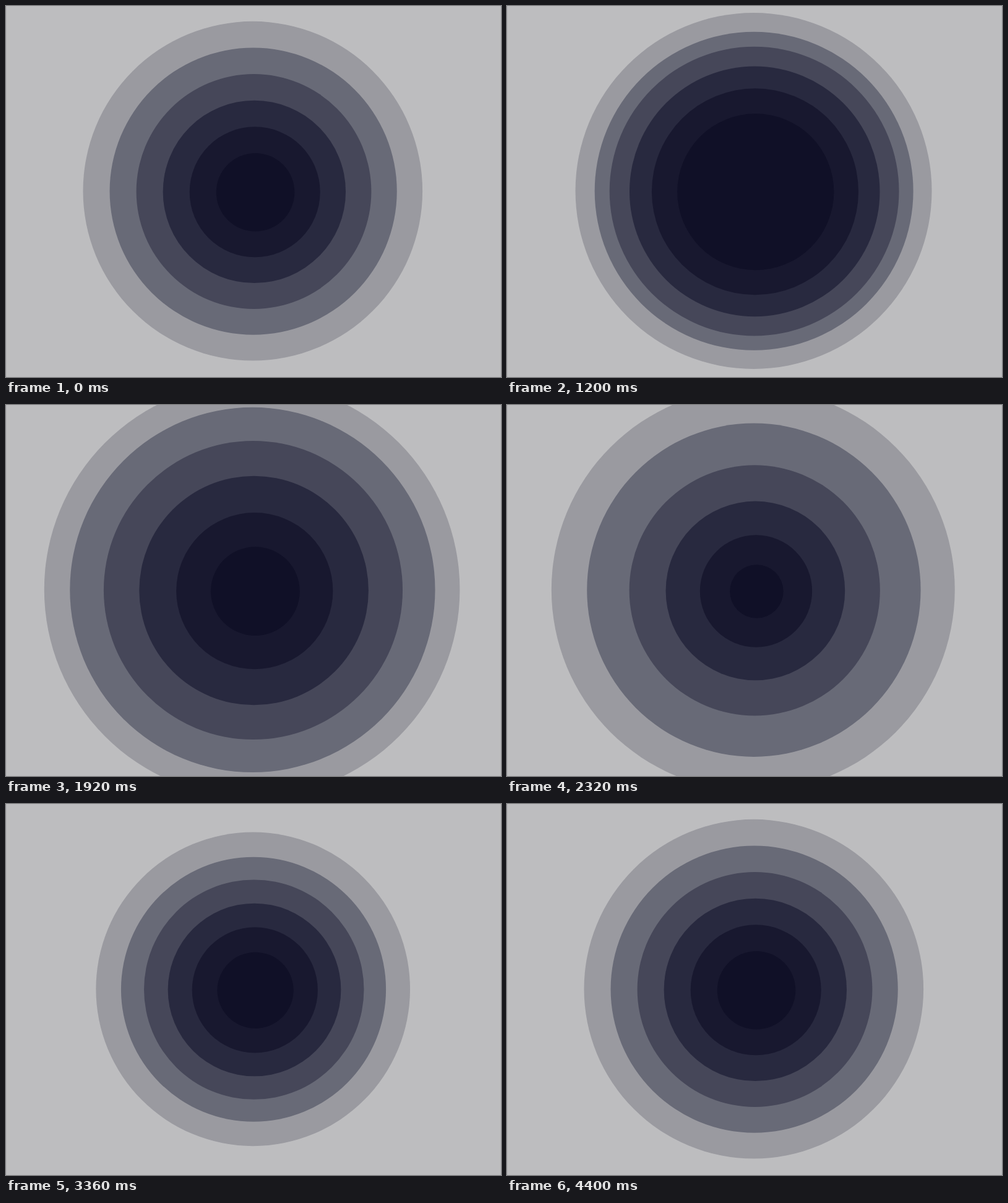
These frames come from a looping animation (800x600 px, 4840 ms). An HTML page:

```html
<!DOCTYPE html>
<html lang="en">
<head>
<meta charset="utf-8">
<title>Pulsing rings</title>
<style>
  html, body { margin: 0; width: 100%; height: 100%; overflow: hidden; background: #bdbdbf; }
  svg { display: block; width: 800px; height: 600px; }
</style>
</head>
<body>
<svg id="stage" viewBox="0 0 800 600">
  <path d="M.5 0V600M799.5 0V600" stroke="#b5b5b8"/>
</svg>
<script>
  const LOOP = 4840, STEP = 40, HOLD = 240;
  const UNIT = 21.1; // all radii and swings are multiples of this

  // Outermost first; size in units, start in ms.
  const rings = [
    { size: 13, start: 840, fill: '#9a9aa0' },
    { size: 11, start: 680, fill: '#686a77' },
    { size: 9, start: 440, fill: '#464759' },
    { size: 7, start: 280, fill: '#28293f' },
    { size: 5, start: 120, fill: '#18182f' },
    { size: 3, start: 0, fill: '#101027' }
  ];

  // Swell, shrink past rest, settle.
  const swing = [
    { from: 0, to: 3, time: 1200 },
    { from: 3, to: -1, time: 1200 },
    { from: -1, to: 0, time: 1160 }
  ];

  const stage = document.getElementById('stage');
  for (const ring of rings) {
    ring.el = document.createElementNS('http://www.w3.org/2000/svg', 'circle');
    ring.el.setAttribute('fill', ring.fill);
    stage.append(ring.el);
  }

  const ease = s => s * s * (3 - 2 * s);

  function offset(t) {
    if (t <= 0) return 0;
    for (const { from, to, time } of swing) {
      if (t < time) return from + (to - from) * ease(t / time);
      t -= time;
    }
    return 0;
  }

  function draw(ms) {
    let t = Math.floor((ms % LOOP) / STEP) * STEP;
    if (t < HOLD) t = 0;
    for (const { el, size, start } of rings) {
      const r = UNIT * (size + offset(t - start));
      el.setAttribute('r', r);
      // The centre drifts up and left as a ring grows.
      el.setAttribute('cx', 404.3 - 0.02 * r);
      el.setAttribute('cy', 301.9 - 0.01 * r);
    }
  }

  const begin = performance.now();
  function tick() {
    draw(performance.now() - begin);
    requestAnimationFrame(tick);
  }
  tick();
</script>
</body>
</html>
```
